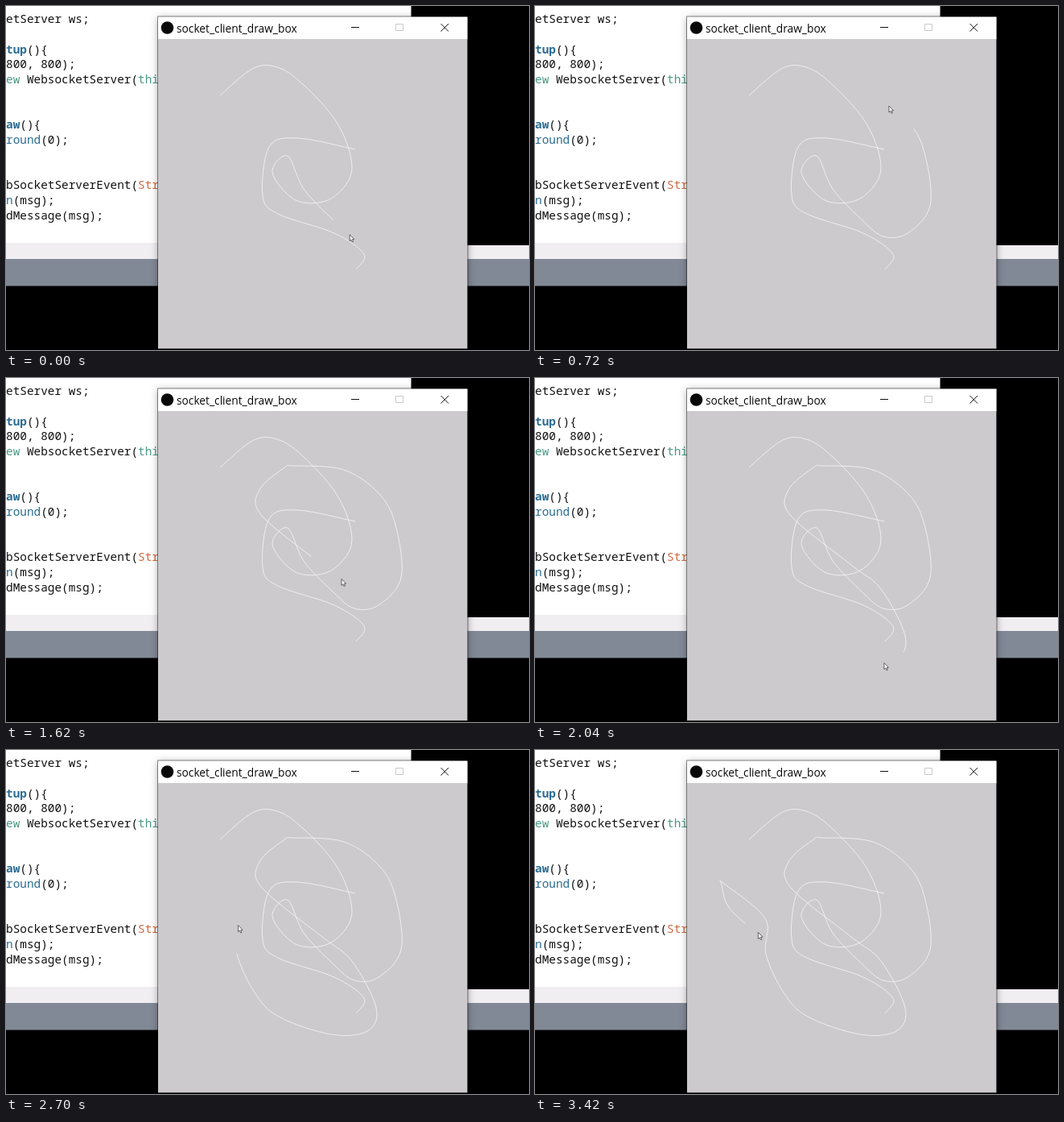
An HTML page with a canvas for the animation above (3.48 s loop, 650x427 px).

```html
<!DOCTYPE html>
<html lang="en">
<head>
<meta charset="utf-8">
<title>Drawing window</title>
<style>
html, body { margin: 0; width: 100%; height: 100%; overflow: hidden; background: #000; }
canvas { display: block; }
</style>
</head>
<body>
<canvas id="stage" width="650" height="427"></canvas>
<script>
const LOOP = 3480, STEP = 60;
const KNOT = 150;   // ms between two knots of the moving stroke
const LEAD = 120;   // ms the pointer runs ahead of the ink
const ctx = document.getElementById('stage').getContext('2d');

const parse = text => text.split(' ').map(pair => pair.split(',').map(Number));

const tail = parse('434,178 362,164 327,175 319,235 338,258 408,282 445,308 435,327');
const opening = parse('266,111 308,77 340,77 371,99 408,140 427,181 427,214 400,241 360,241 ' +
  '331,207 350,186 370,227');
const trail = parse('407,266 433,286 463,282 491,248 485,186 465,145 420,114 358,109 345,112 ' +
  '315,139 318,171 393,232 430,262 460,320 449,349 404,353 339,331 309,301 287,253 286,209 ' +
  '235,166 232,167 240,194 266,219 283,229');
const stroke = [...opening, ...trail];

// Point on the Catmull-Rom curve through the knots; u counts knots
function pointAt(knots, u) {
  const last = knots.length - 1;
  const i = Math.min(Math.floor(u), last - 1), k = u - i;
  const [a, b, c, d] = [-1, 0, 1, 2].map(n => knots[Math.max(0, Math.min(last, i + n))]);
  return [0, 1].map(n => b[n] + k / 2 * (c[n] - a[n] +
    k * (2 * a[n] - 5 * b[n] + 4 * c[n] - d[n] + k * (3 * (b[n] - c[n]) + d[n] - a[n]))));
}

function line(points, color, width = 1) {
  ctx.beginPath();
  points.forEach(p => ctx.lineTo(...p));
  ctx.strokeStyle = color;
  ctx.lineWidth = width;
  ctx.stroke();
}

function ink(knots, end) {
  const points = [];
  for (let u = 0; u < end; u += 0.125) points.push(pointAt(knots, u));
  line([...points, pointAt(knots, end)], '#f5f4f5', 0.85);
}

function rect(color, x, y, w, h) {
  ctx.fillStyle = color;
  ctx.fillRect(x, y, w, h);
}

const INK = '#111', BLUE = '#2a6c92', TEAL = '#4a9a87', ORANGE = '#d06a3e';
const code = [
  [['etServer ws;', INK]],
  [],
  [['tup', BLUE, 'bold'], ['(){', INK]],
  [['800, 800);', INK]],
  [['ew', TEAL], [' WebsocketServer(', INK], ['this', TEAL]],
  [],
  [],
  [['aw', BLUE, 'bold'], ['(){', INK]],
  [['round', BLUE], ['(0);', INK]],
  [],
  [],
  [['bSocketServerEvent(', INK], ['String', ORANGE]],
  [['n', BLUE], ['(msg);', INK]],
  [['dMessage(msg);', INK]]
];

function drawDesktop() {
  rect('#000', 0, 0, 650, 427);
  rect('#f1eef2', 0, 297, 650, 17);
  rect('#828996', 0, 314, 650, 33.5);
  rect('#fff', 0, 0, 503.5, 294);
  rect('#f1eef2', 0, 294, 503.5, 20);
  code.forEach((parts, row) => {
    let x = 0;
    for (const [text, color, weight = 'normal'] of parts) {
      ctx.font = `${weight} 14.4px "Noto Sans Mono", "DejaVu Sans Mono", monospace`;
      ctx.fillStyle = color;
      ctx.fillText(text, x, 21 + row * 18.75);
      x += ctx.measureText(text).width;
    }
  });
}

function drawWindow() {
  ctx.shadowColor = 'rgba(0,0,0,.35)';
  ctx.shadowBlur = 9;
  rect('#fff', 189, 13.5, 384.5, 28);
  rect('#cccacd', 189, 41, 384.5, 384.5);
  ctx.shadowColor = 'transparent';
  rect('#fff', 189, 13.5, 384.5, 27.5);
  ctx.lineWidth = 1;
  ctx.strokeStyle = 'rgba(0,0,0,.45)';
  ctx.strokeRect(188.5, 13, 385.5, 412.5);

  ctx.fillStyle = '#080808';
  ctx.beginPath();
  ctx.arc(200.5, 27, 7.8, 0, 7);
  ctx.fill();
  ctx.font = '13.75px "Open Sans", "Noto Sans", sans-serif';
  ctx.fillText('socket_client_draw_box', 212, 32.5);

  line([[429, 26.5], [439, 26.5]], INK);
  ctx.strokeStyle = '#cbcbcb';
  ctx.strokeRect(484.5, 22.5, 9, 8);
  line([[540.5, 22], [550, 31.5]], INK);
  line([[550, 22], [540.5, 31.5]], INK);
}

const arrow = new Path2D('M0 0V8.6L2 6.9 3.4 10 4.8 9.4 3.5 6.3 6 6.2Z');

function drawPointer(x, y) {
  ctx.save();
  ctx.translate(x - 0.5, y);
  ctx.scale(0.92, 0.92);
  ctx.fillStyle = '#fff';
  ctx.fill(arrow);
  ctx.strokeStyle = '#333';
  ctx.lineWidth = 0.8;
  ctx.stroke(arrow);
  ctx.restore();
}

function draw(t) {
  const knotAt = time => opening.length + time / KNOT;
  drawDesktop();
  drawWindow();
  ink(tail, tail.length - 1);
  ink(stroke, knotAt(t));
  drawPointer(...pointAt(stroke, knotAt(t + LEAD)));
}

const start = performance.now();
function tick() {
  const t = (performance.now() - start) % LOOP;
  draw(Math.floor(t / STEP) * STEP);
  requestAnimationFrame(tick);
}
tick();
</script>
</body>
</html>
```
